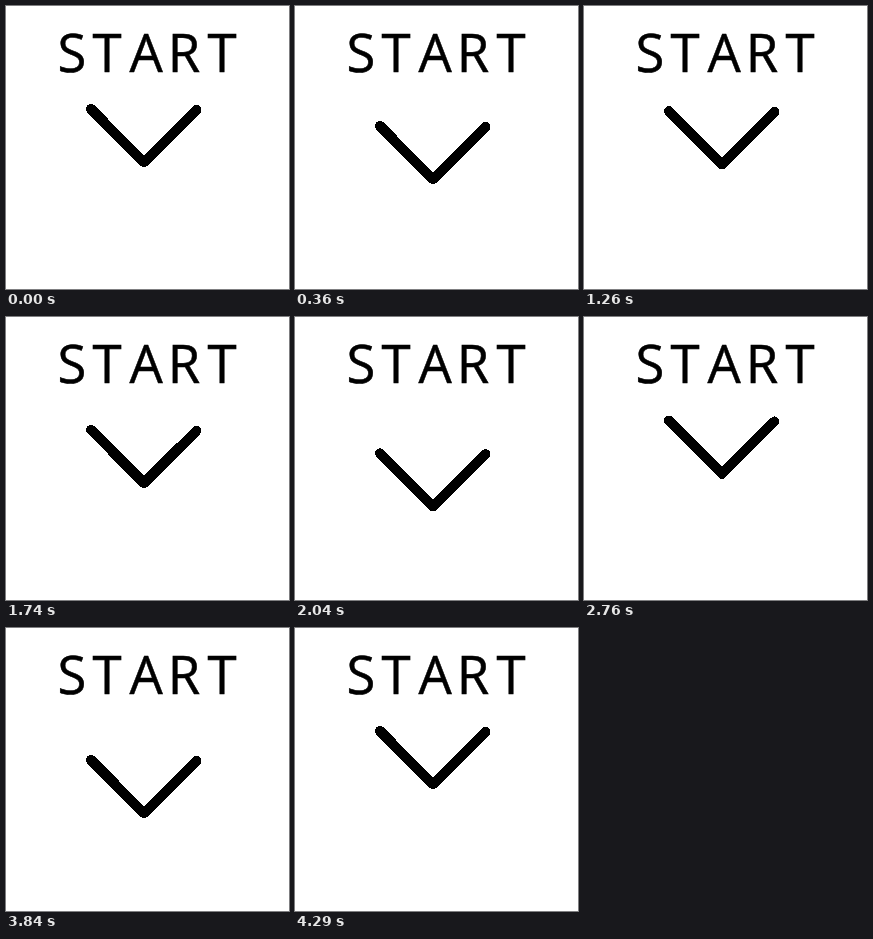
An HTML page for the animation above (4.32 s loop, 283x283 px).

```html
<!DOCTYPE html>
<html lang="en">
<head>
<meta charset="utf-8">
<title>Start</title>
<style>
  html, body { margin: 0; width: 100%; height: 100%; overflow: hidden; background: #fff; }
  svg { display: block; width: 100%; height: 100%; }
  text {
    font: 500 52.5px "Open Sans", "Noto Sans", sans-serif;
    font-stretch: semi-condensed;
    text-anchor: middle;
    stroke: #000;
    stroke-width: 0.5;
  }
  path {
    fill: none;
    stroke: #000;
    stroke-width: 10;
    stroke-linecap: round;
    stroke-linejoin: round;
    shape-rendering: crispEdges;
  }
</style>
</head>
<body>
<svg viewBox="0 0 283 283">
  <text x="66 101 140 178 216" y="65.5">START</text>
  <path id="arrow" d="M85 103 L138 156.2 L190.5 103.8"/>
</svg>
<script>
  const HALF = 720;
  const STEP = 30;
  const TRAVEL = 34;
  const arrow = document.getElementById("arrow");

  const easeInOutCubic = p => p < 0.5 ? 4 * p ** 3 : 1 - 4 * (1 - p) ** 3;

  function draw(ms) {
    const t = Math.floor(ms / STEP + 1e-6) * STEP % (2 * HALF);
    const p = t < HALF ? t / HALF : 2 - t / HALF;
    arrow.setAttribute("transform", `translate(0 ${(TRAVEL * easeInOutCubic(p)).toFixed(3)})`);
  }

  const start = performance.now();
  function tick() {
    draw(performance.now() - start);
    requestAnimationFrame(tick);
  }
  tick();
</script>
</body>
</html>
```
